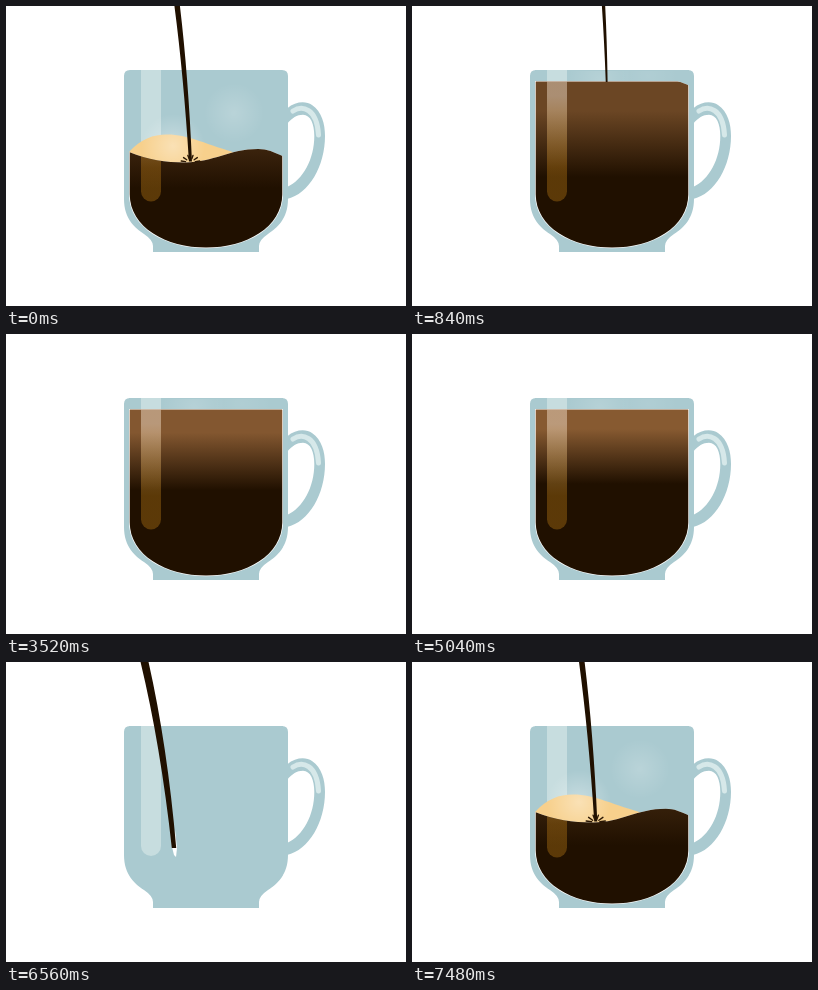
An HTML page for the animation above (7.52 s loop, 400x300 px).

```html
<!DOCTYPE html>
<html lang="en">
<head>
<meta charset="utf-8">
<title>Coffee pour</title>
<style>
html, body { margin: 0; width: 100%; height: 100%; overflow: hidden; background: #fff; }
svg { display: block; width: 100vw; height: 100vh; }
</style>
</head>
<body>
<svg viewBox="0 0 400 300">
  <defs>
    <clipPath id="bowl"><path d="M123 75H277V188C277 222 240 242.3 200 242.3C160 242.3 123 222 123 188Z"/></clipPath>
    <clipPath id="inner"><path d="M123.7 75.6H276.3V188C276.3 221.4 240 241.6 200 241.6C160 241.6 123.7 221.4 123.7 188Z"/></clipPath>
    <clipPath id="glass"><rect x="119" y="65" width="162" height="178"/></clipPath>
    <clipPath id="wet"><path id="wetPath"/></clipPath>
    <linearGradient id="brew" gradientUnits="userSpaceOnUse" x1="0" x2="0">
      <stop id="brewTop" offset="0"/><stop offset="1" stop-color="#201000"/>
    </linearGradient>
    <linearGradient id="sheen" gradientUnits="userSpaceOnUse" x1="0" x2="0" y1="90" y2="162">
      <stop offset="0" stop-color="#ffeedb" stop-opacity=".43"/>
      <stop offset="1" stop-color="#f5a31c" stop-opacity=".28"/>
    </linearGradient>
    <radialGradient id="glow">
      <stop offset="0" stop-color="#fff" stop-opacity=".36"/>
      <stop offset="1" stop-color="#fff" stop-opacity="0"/>
    </radialGradient>
  </defs>

  <g fill="#aacad0">
    <path d="M118 70Q118 64 124 64H276Q282 64 282 70V193C282 213 271 222 262 228Q253 234 253 240V246H147V240Q147 234 138 228C129 222 118 213 118 193Z"/>
    <path d="M281 102.5C290 95 300 95 306 99C316 106 319 118 319 130C319 160 303 188 281 193V181C297 174 308.3 153 308.3 130C308.3 118 304.5 108.8 297 108.8C291 108.8 286 112 281 118Z"/>
  </g>
  <path d="M287 105C296 99 311 102 312.5 129" fill="none" stroke="#d6e8e9" stroke-width="5" stroke-linecap="round"/>
  <path d="M135 64H155V184A10 10 0 0 1 135 184Z" fill="#c7dddf"/>

  <g clip-path="url(#bowl)"><path id="foam" fill="#f7d08c"/></g>
  <g clip-path="url(#glass)">
    <circle id="glowLeft" r="32" fill="url(#glow)"/>
    <circle id="glowRight" r="30" fill="url(#glow)"/>
  </g>
  <g clip-path="url(#bowl)"><path id="rim" fill="#fff"/></g>
  <g clip-path="url(#inner)">
    <path id="coffee" fill="url(#brew)"/>
    <path d="M135 64H155V185.5A10 10 0 0 1 135 185.5Z" fill="url(#sheen)" clip-path="url(#wet)"/>
  </g>

  <path id="tip" fill="#fff"/>
  <path id="stream" fill="#201000"/>
  <path id="splash" fill="none" stroke="#2b1805" stroke-width="1.4" stroke-linecap="round"/>
</svg>
<script>
const LOOP = 7520, POUR_START = 6360;
const LAND = 240, STOP = 2680;
const BOWL = { left: 123, right: 277, top: 75 };
const DARK = [32, 16, 0], MILKY = [145, 97, 54];

const el = id => document.getElementById(id);
const clamp = (v, a, b) => Math.min(b, Math.max(a, v));
const mix = (a, b, k) => a + (b - a) * k;
const ramp = (t, from, to) => clamp((t - from) / (to - from), 0, 1);
const setPath = (id, d) => el(id).setAttribute('d', d);

// The front surface has one trough and one crest that drift left as the cup fills.
function surfaceAt(t) {
  const level = 262 - .1 * t;
  const drift = clamp((t - 1140) / 460, -1, 1.5);
  const grow = ramp(t, LAND, 700);
  return {
    level,
    troughX: mix(180, 161, drift),
    trough: level + 10.5 * grow,
    crestX: mix(253, 236, drift),
    crest: level + mix(-3, 1, drift) * grow,
    right: level + mix(4, 13, drift) * grow,
    foamX: mix(226, 217, drift)
  };
}

function drawLiquid(t, s) {
  const { left, right } = BOWL;
  const run = s.troughX - left, span = s.crestX - s.troughX;
  const front = `M${left} ${s.level}` +
    `C${left + run * .35} ${mix(s.level, s.trough, .75)} ${s.troughX - run * .35} ${s.trough} ${s.troughX} ${s.trough}` +
    `C${s.troughX + span * .4} ${s.trough} ${s.crestX - span * .4} ${s.crest} ${s.crestX} ${s.crest}` +
    `C${s.crestX + 9} ${s.crest} ${right - 9} ${s.right - 4} ${right} ${s.right}V250H${left}Z`;
  const peak = s.level - 17.5;
  const back = `M${left} ${s.level}C135 ${peak + 4.5} 147 ${peak} 161 ${peak}` +
    `C183 ${peak} 201 ${s.level - 7} ${s.foamX + 8} ${s.level + 2}V${s.level + 20}H${left}Z`;
  const poured = t >= LAND;
  for (const id of ['coffee', 'rim', 'wetPath']) setPath(id, poured ? front : '');
  setPath('foam', poured ? back : '');
}

// The brown fades in quickly, then ever more slowly, while its lower end creeps up.
function drawBrew(t, level) {
  const age = Math.max(0, t - 1020), k = age / (age + 500);
  const late = ramp(t, 1600, LOOP);
  const rgb = DARK.map((c, i) => Math.round(mix(c, MILKY[i], k)));
  el('brewTop').setAttribute('stop-color', `rgb(${rgb})`);
  el('brew').setAttribute('y1', Math.max(level, mix(106, 92, late)));
  el('brew').setAttribute('y2', Math.max(level + 26, mix(165, 143, late) + 22 * (1 - k)));
}

function ribbon(x0, y0, x1, y1, w0, w1) {
  const mx = mix(x0, x1, .66), my = mix(y0, y1, .45), wm = mix(w0, w1, .35);
  return `M${x0 - w0 / 2} ${y0}Q${mx - wm / 2} ${my} ${x1 - w1 / 2} ${y1}` +
    `H${x1 + w1 / 2}Q${mx + wm / 2} ${my} ${x0 + w0 / 2} ${y0}Z`;
}

function splashAt(x, y, t) {
  const size = ramp(t, 2100, 1000) * 1.2;
  const phase = (t % 160) / 160;
  let d = '';
  for (let i = 0; i < 6; i++) {
    const a = Math.PI * (1.06 + i * .176);
    const near = (3 + 3 * phase) * size, far = near + (1 + 3 * (1 - phase)) * size;
    const at = q => `${x + Math.cos(a) * q * 1.3} ${y + Math.sin(a) * q}`;
    d += `M${at(near)}L${at(far)}`;
  }
  return d;
}

function drawStream(t, surface) {
  const fall = (t - 40) * 1.155, tail = Math.max(0, t - STOP);
  const end = Math.min(fall, surface);
  const flowing = fall > 0 && tail < end;
  const hitting = flowing && fall >= surface;
  const age = Math.min(t, 1760) - 200;
  const xEnd = 168 + age * .0171;
  const xTop = mix(138.5 + age * .034, xEnd, tail / end);
  const width = 8 - (t - 200) * .0026, tipWidth = width * .55;
  setPath('stream', flowing ? ribbon(xTop, tail, xEnd, end, width, tipWidth) : '');
  setPath('tip', flowing && !hitting
    ? `M${xEnd - 2} ${end - 1}L${xEnd} ${end + 7}L${xEnd + 2} ${end + 9}L${xEnd + 3} ${end}L${xEnd + 1} ${end - 18}Z` : '');
  setPath('splash', hitting && t < 2000 ? splashAt(xEnd, end + 1, t) : '');
}

function drawGlow(t) {
  const rise = ramp(t, 1160, 1760);
  const power = ramp(t, 500, 1000) * mix(1, .4, rise);
  const place = (id, x, y, opacity) => {
    el(id).setAttribute('cx', x);
    el(id).setAttribute('cy', y);
    el(id).setAttribute('opacity', opacity);
  };
  place('glowLeft', mix(167, 188, rise), mix(140, 74, rise), power);
  place('glowRight', mix(228, 236, rise), mix(107, 70, rise), power / 2);
}

function render(ms) {
  const t = (ms + LOOP - POUR_START) % LOOP;
  const s = surfaceAt(t);
  drawLiquid(t, s);
  drawBrew(t, s.level);
  drawStream(t, Math.max(BOWL.top + 1, s.trough - 1));
  drawGlow(t);
}

const start = performance.now();
function tick() {
  render((performance.now() - start) % LOOP);
  requestAnimationFrame(tick);
}
tick();
</script>
</body>
</html>
```
